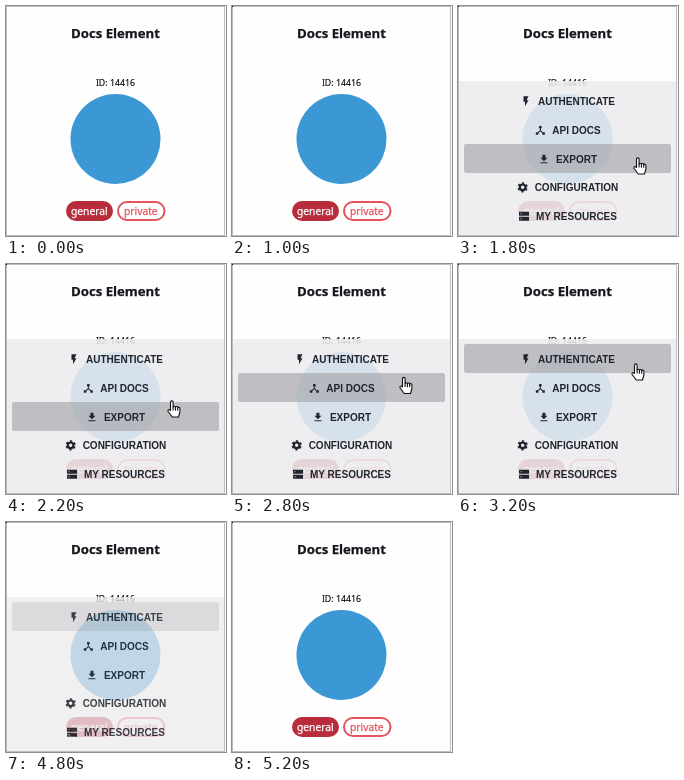
Recreate the animation shown at these times as an HTML page. Size 220 by 230 pixels, loop 6 s.

```html
<!DOCTYPE html>
<html lang="en">
<head>
<meta charset="utf-8">
<title>Element card</title>
<style>
  html, body { margin: 0; width: 220px; height: 230px; overflow: hidden; background: #fefefe; }
  svg { display: block; }
  text { font-family: "Noto Sans", "Open Sans", sans-serif; text-anchor: middle; }
  .title { font-weight: 700; font-size: 13.2px; fill: #14161c; stroke: #14161c; stroke-width: .25; }
  .id { font-size: 8.8px; fill: #111; stroke: #111; stroke-width: .15; }
  .tag { font-size: 10.3px; fill: currentColor; stroke: currentColor; stroke-width: .25; }
  #menu text { font: 700 10px "Liberation Sans", Arial, sans-serif; text-anchor: start; }
  #menu .item { fill: #20242e; }
  #menu .hover { fill: #a0a1a5; }
</style>
</head>
<body>
<svg width="220" height="230" viewBox="0 0 220 230">
  <defs>
    <path id="bolt" d="M7 2v11h3v9l7-12h-4l4-8z"/>
    <path id="hub" d="M17 16l-4-4V8.8C14.2 8.4 15 7.3 15 6a3 3 0 0 0-6 0c0 1.3.8 2.4 2 2.8V12l-4 4H3v5h5v-3l4-4.2 4 4.2v3h5v-5z"/>
    <path id="load" d="M19 9h-4V3H9v6H5l7 7zM5 18v2h14v-2z"/>
    <g id="gear" fill="none" stroke="#20242e">
      <circle cx="12" cy="12" r="5.6" stroke-width="4.4"/>
      <circle cx="12" cy="12" r="8.6" stroke-width="3.4" pathLength="6" stroke-dasharray=".5" stroke-dashoffset="-.25"/>
    </g>
    <path id="stack" fill-rule="evenodd" d="M2 3h20v8H2zM2 13h20v8H2zM5 6v2h2V6zM5 16v2h2v-2z"/>
  </defs>

  <rect width="220" height="230" fill="#fefefe"/>
  <text class="title" x="109.5" y="32">Docs Element</text>
  <text class="id" x="109.5" y="80">ID: 14416</text>
  <circle cx="109.5" cy="133" r="45" fill="#3c98d4"/>
  <rect x="60" y="195" width="47" height="20" rx="10" fill="#b92c3b"/>
  <text class="tag" x="83.3" y="208.7" color="#fff">general</text>
  <rect x="112" y="196" width="46.5" height="18" rx="9" fill="#fff" stroke="#e4535e" stroke-width="2"/>
  <text class="tag" x="134.8" y="208.7" color="#e4535e">private</text>

  <g id="menu" opacity="0">
    <rect x="1" y="75" width="218" height="154" fill="#ececee" opacity=".88"/>
  </g>
  <rect x=".5" y=".5" width="218" height="229" fill="none" stroke="#bdbdbd"/>
  <rect id="corner" width="1" height="1"/>

  <path id="arrow" d="M0 0v14l3.2-3 2.2 5.4 2.6-1.1-2.3-5.2h4.3z" stroke="#fff" stroke-width=".8"/>
  <g id="hand" stroke="#111" stroke-width="1.1" stroke-linejoin="round" stroke-linecap="round">
    <path fill="#fff" d="M3.5 9.5V2.2a1.3 1.3 0 0 1 2.6 0V7a1.2 1.2 0 0 1 2.3.2a1.2 1.2 0 0 1 2.3.5a1.2 1.2 0 0 1 2.2.8V12l-1.4 5H5.2L1 11.2a1.2 1.2 0 0 1 1.7-1.5L3.5 10.5z"/>
    <path fill="none" d="M6.1 7v3M8.4 7.2v3M10.7 7.7v2.5"/>
  </g>
</svg>
<script>
  const LOOP = 6000, TICK = 200, FADE = 300;
  const ENTER = 1600, LEAVE = 4800;
  const CENTER = 109.5, ROW_TOP = 80, ROW = 29, ICON = 12, GAP = 6;
  const NS = "http://www.w3.org/2000/svg";
  const $ = id => document.getElementById(id);

  const items = {
    bolt: "AUTHENTICATE",
    hub: "API DOCS",
    load: "EXPORT",
    gear: "CONFIGURATION",
    stack: "MY RESOURCES"
  };

  // pointer key points
  const path = [
    { t: ENTER, x: 210.5, y: 161 },
    { t: 1800, x: 175, y: 151 },
    { t: 2200, x: 161, y: 136 },
    { t: 2800, x: 167, y: 112.5 },
    { t: 3200, x: 173, y: 99 }
  ];

  const ramp = (t, from) => Math.min(1, Math.max(0, (t - from) / FADE));
  const mix = (a, b, k) => a + (b - a) * k;

  function pointerAt(t) {
    const next = path.findIndex(p => p.t > t);
    if (next < 0) return path.at(-1);
    const a = path[Math.max(0, next - 1)], b = path[next];
    const k = Math.max(0, (t - a.t) / (b.t - a.t));
    return { x: mix(a.x, b.x, k), y: mix(a.y, b.y, k) };
  }

  function add(tag, attrs, text = "") {
    const el = document.createElementNS(NS, tag);
    for (const key in attrs) el.setAttribute(key, attrs[key]);
    el.textContent = text;
    return $("menu").appendChild(el);
  }

  // each row is an icon and a label, centred together
  const rows = Object.entries(items).map(([icon, label], i) => {
    const base = Math.round(99.2 + i * 28.75);
    const row = add("rect", { class: "hover", x: 6, y: ROW_TOP + i * ROW, width: 207, height: ROW, rx: 2 });
    const text = add("text", { class: "item", y: base }, label);
    const left = CENTER - (ICON + GAP + text.getComputedTextLength()) / 2;
    text.setAttribute("x", left + ICON + GAP);
    add("use", { class: "item", href: "#" + icon, transform: `translate(${left} ${base - 9.7}) scale(${ICON / 24})` });
    return row;
  });

  function show(id, on, { x, y } = { x: 0, y: 0 }) {
    $(id).setAttribute("visibility", on ? "visible" : "hidden");
    $(id).setAttribute("transform", `translate(${x} ${y})`);
  }

  function draw(time) {
    const t = Math.floor(time / TICK) * TICK;
    const pointer = pointerAt(t);
    const inside = t > ENTER;
    const current = Math.floor((pointer.y + 3 - ROW_TOP) / ROW);
    const glow = inside ? .6 * (1 - ramp(t, LEAVE - 140)) : 0;

    $("menu").setAttribute("opacity", Math.min(ramp(t, ENTER - TICK), 1 - ramp(t, LEAVE - 40)));
    rows.forEach((row, i) => row.setAttribute("opacity", i === current ? glow : 0));
    show("arrow", t === ENTER, pointer);
    show("hand", inside && t < LEAVE, pointer);
    show("corner", t >= 2 * TICK);
  }

  const start = performance.now();
  function tick() {
    draw((performance.now() - start) % LOOP);
    requestAnimationFrame(tick);
  }
  tick();
</script>
</body>
</html>
```
